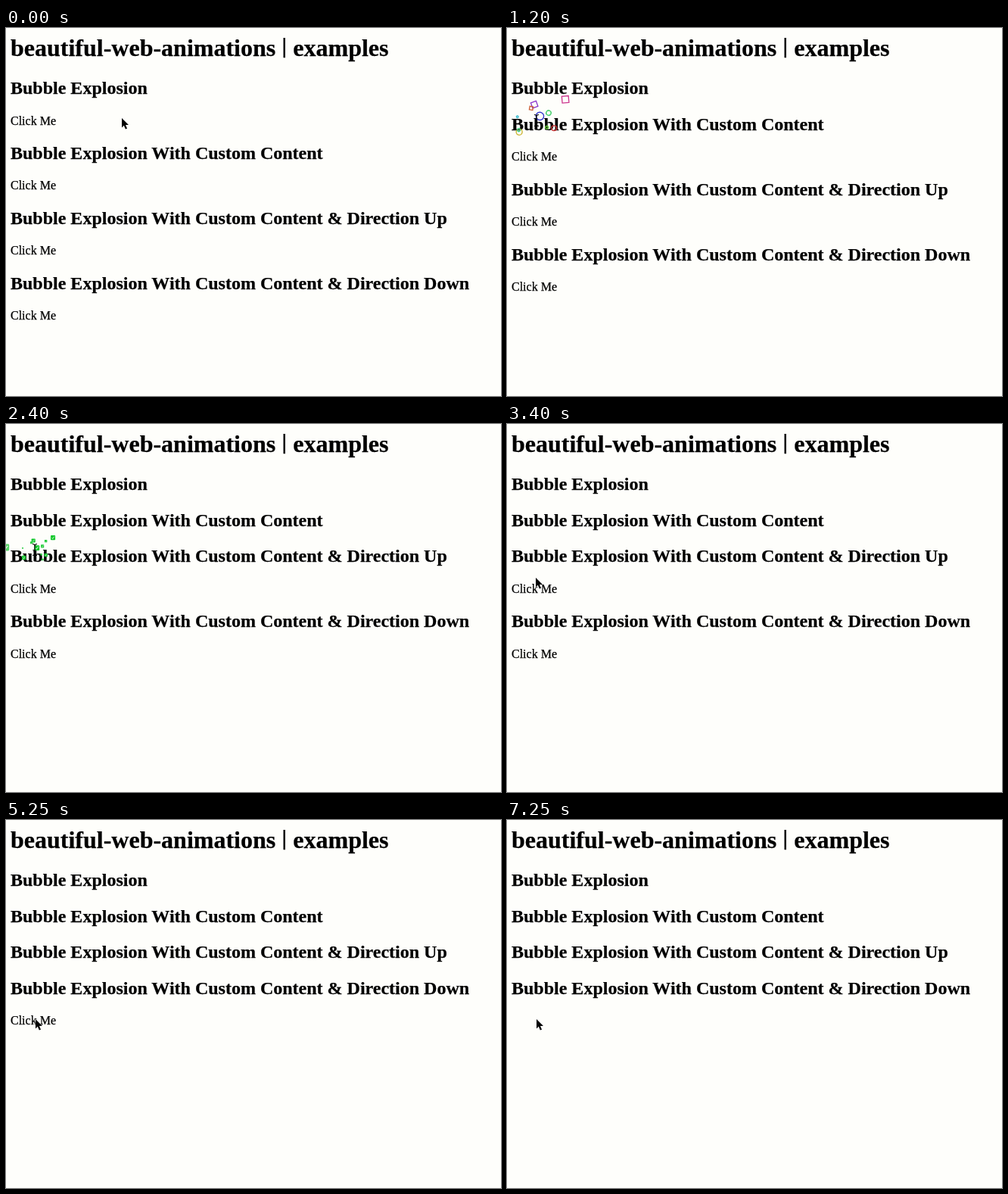
These frames come from a looping animation (654x486 px, 7300 ms). An HTML page:

```html
<!DOCTYPE html>
<html lang="en">
<head>
<meta charset="utf-8">
<title>beautiful-web-animations | examples</title>
<style>
  html, body { margin: 0; width: 100%; height: 100%; overflow: hidden; background: #fefefb; }
  svg { display: block; width: 654px; height: 486px; }
  text { font: 16px "Liberation Serif", "Times New Roman", serif; stroke: #000; stroke-width: .25px; }
  .h1 { font-size: 32px; font-weight: bold; }
  .h2 { font-size: 24px; font-weight: bold; }
  .bar { font: 27px "Liberation Sans", Arial, sans-serif; }
</style>
</head>
<body>
<svg viewBox="0 0 654 486">
  <defs>
    <g id="ring"><circle r=".44" fill="none" stroke="currentColor" stroke-width="1.4" vector-effect="non-scaling-stroke"/></g>
    <g id="box"><rect x="-.42" y="-.42" width=".84" height=".84" fill="none" stroke="currentColor" stroke-width="1.3" vector-effect="non-scaling-stroke"/></g>
    <g id="check">
      <rect x="-.5" y="-.5" width="1" height="1" rx=".16" fill="#12c72c"/>
      <path d="M-.27 .03L-.07 .25L.28 -.25" fill="none" stroke="#e6ffe6" stroke-width=".13"/>
    </g>
    <g id="flame">
      <path d="M-.03 -.55C.02 -.28 .22 -.2 .24 0C.3 -.06 .31 -.15 .29 -.23C.5 .04 .44 .5 0 .5C-.44 .5 -.47 .08 -.28 -.17C-.28 -.06 -.24 0 -.18 .02C-.22 -.22 -.12 -.4 -.03 -.55Z" fill="#f4791f"/>
      <path d="M0 -.05C.04 .1 .23 .15 .23 .3C.23 .43 .12 .49 0 .49C-.14 .49 -.24 .42 -.23 .27C-.22 .14 -.04 .1 0 -.05Z" fill="#ffd85a"/>
    </g>
    <g id="cross"><path d="M-.42 -.42L.42 .42M.42 -.42L-.42 .42" stroke="#e0303a" stroke-width=".23"/></g>
  </defs>
  <text class="h1" x="6" y="37">beautiful-web-animations <tspan class="bar" dy="-4.5">|</tspan><tspan dy="4.5"> examples</tspan></text>
  <g id="copy"></g>
  <g id="bits"></g>
  <g id="cursor">
    <path id="arrow" transform="scale(.88)" d="M0 0V14.2L3.2 11.2L5.5 16.6L8 15.5L5.7 10.3H10.2Z" stroke="#fff" paint-order="stroke"/>
    <path id="beam" d="M-3 -7.5Q0 -7.5 0 -5Q0 -7.5 3 -7.5M0 -5V5M-3 7.5Q0 7.5 0 5Q0 7.5 3 7.5M-1.8 2.5H1.8" fill="none" stroke="#000" stroke-width="1.2"/>
  </g>
</svg>
<script>
const LOOP = 7300, GLIDE = 900, REST = 150;
const $ = id => document.getElementById(id);
const clamp = v => Math.max(0, Math.min(1, v));
const lerp = (a, b, k) => a + (b - a) * k;
// Evenly scattered values in 0..1, one sequence per irrational step.
const scatter = (i, step) => ((i + 1) * step) % 1;

function make(tag, parent, attrs) {
  const el = document.createElementNS("http://www.w3.org/2000/svg", tag);
  for (const key in attrs) el.setAttribute(key, attrs[key]);
  return parent.appendChild(el);
}
function show(el, on) {
  el.style.display = on ? "" : "none";
}

// A click at (x, y) hides its label and throws `count` bits into the area reach × top..bottom.
const bursts = [
  { start: 900, x: 39, y: 122, tail: "", shapes: ["ring", "ring", "box"],
    count: 11, life: 340, size: 22, reach: 75, top: -48, bottom: 55 },
  { start: 2270, x: 38, y: 166, tail: " With Custom Content", shapes: ["check"],
    count: 13, life: 150, size: 13, reach: 48, top: -28, bottom: 36 },
  { start: 3970, x: 38, y: 213, tail: " With Custom Content & Direction Up", shapes: ["flame"],
    count: 9, life: 360, size: 17, reach: 46, top: -48, bottom: 8 },
  { start: 5480, x: 39, y: 263, tail: " With Custom Content & Direction Down", shapes: ["cross"],
    count: 17, life: 540, size: 19, reach: 58, top: 15, bottom: 72 }
];

for (const b of bursts) {
  b.head = make("text", $("copy"), { class: "h2", x: 6 });
  b.label = make("text", $("copy"), { x: 6 });
  b.head.textContent = "Bubble Explosion" + b.tail;
  b.label.textContent = "Click Me";
  b.bits = Array.from({ length: b.count }, (_, i) => ({
    el: make("use", $("bits"), {
      href: "#" + b.shapes[i % b.shapes.length],
      color: `hsl(${i * 137 % 360} 60% 50%)`
    }),
    dx: lerp(-b.reach, b.reach, scatter(i, .8192)),
    dy: lerp(b.top, b.bottom, scatter(i, .671)),
    life: b.life * (1 + 1.5 * scatter(i, .5497)),
    size: b.size * lerp(.25, 1, scatter(i, .618)),
    turn: b.shapes.length > 1 ? i * 35 : 0
  }));
}

function layText(t) {
  let y = 87.1;
  for (const b of bursts) {
    const open = t < b.start;
    b.base = Math.round(y);
    b.head.setAttribute("y", b.base);
    b.label.setAttribute("y", Math.round(y + 40.4));
    show(b.label, open);
    y += open ? 85.9 : 47.6;
  }
}

function throwBits(b, t) {
  for (const p of b.bits) {
    const q = (t - b.start) / p.life;
    const live = q > 0 && q < 1;
    show(p.el, live);
    if (!live) continue;
    p.el.setAttribute("transform",
      `translate(${b.x + p.dx * q} ${b.y + p.dy * q}) rotate(${p.turn}) scale(${p.size * q})`);
    p.el.setAttribute("opacity", clamp((1 - q) / .26));
  }
}

// The pointer glides to each label and rests shortly before its click.
function movePointer(t) {
  let x = 153, y = 119;
  for (const b of bursts) {
    const end = b.start - REST, begin = Math.max(50, end - GLIDE);
    const u = clamp((t - begin) / (end - begin));
    const k = u * (2 - u);
    x = lerp(x, b.x, k);
    y = lerp(y, b.y, k);
  }
  x = Math.round(x);
  y = Math.round(y);
  const beam = bursts.some(b => y > b.base - 17 && y < b.base + 7);
  $("cursor").setAttribute("transform", `translate(${x} ${y})`);
  show($("beam"), beam);
  show($("arrow"), !beam);
}

function render(t) {
  layText(t);
  for (const b of bursts) throwBits(b, t);
  movePointer(t);
}

const begin = performance.now();
function tick() {
  render((performance.now() - begin) % LOOP);
  requestAnimationFrame(tick);
}
tick();
</script>
</body>
</html>
```
